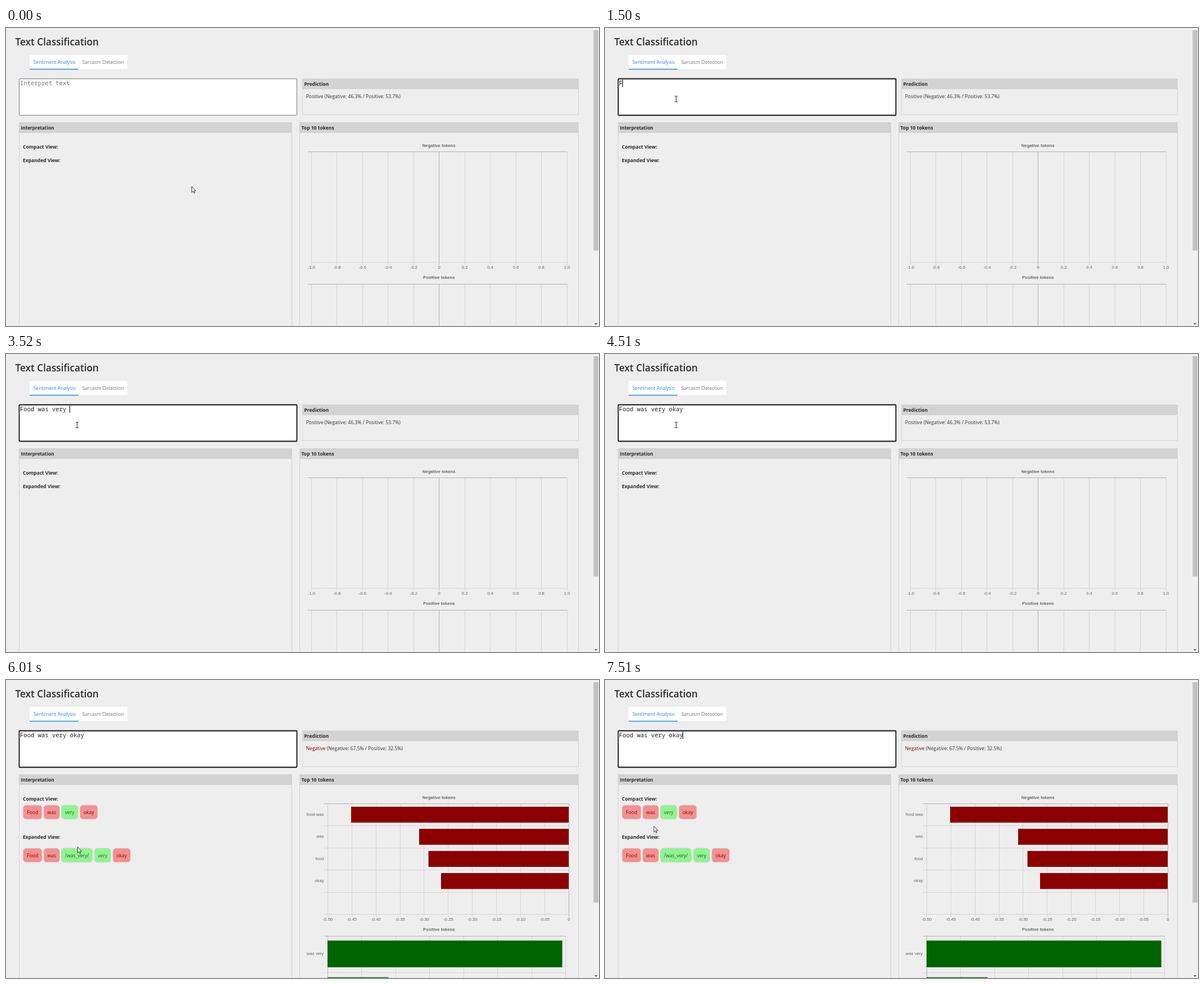
Recreate the animation shown at these times as an HTML page. Size 1055 by 531 pixels, loop 8 s.

```html
<!DOCTYPE html>
<html lang="en">
<head>
<meta charset="utf-8">
<title>Text Classification</title>
<style>
  html, body { margin: 0; width: 100%; height: 100%; overflow: hidden; background: #eee; }
  svg { display: block; width: 100%; height: 100%; }
  text { font: 8.54px "Open Sans", "Noto Sans", sans-serif; fill: #333; white-space: pre; }
  .title { font-size: 17.2px; font-weight: 600; fill: #2b2b2e; }
  .bold { font-weight: 700; fill: #29292c; }
  .chart { font: 7.69px "Liberation Sans", Arial, sans-serif; fill: #666; }
  .caption { font-weight: 700; }
  .mono { font: 10.55px "Noto Sans Mono", "DejaVu Sans Mono", monospace; fill: #222; }
  .hidden { display: none; }
</style>
</head>
<body>
<svg id="stage" viewBox="0 0 1055 531"></svg>
<script>
const LOOP = 8000;
const GRID = '#d5d5d5', AXIS = '#b3b3b3', PANEL = '#d3d3d3';
const RED = '#8b0000', GREEN = '#006400';

const rect = (x, y, w, h, fill, extra = '') =>
  `<rect x="${x}" y="${y}" width="${w}" height="${h}" fill="${fill}" ${extra}/>`;
const line = (x1, y1, x2, y2, color) =>
  `<path d="M${x1} ${y1}L${x2} ${y2}" stroke="${color}"/>`;
const text = (x, y, content, cls = '', extra = '') =>
  `<text x="${x}" y="${y}" class="${cls}" ${extra}>${content}</text>`;
const group = (id, content) => `<g id="${id}">${content}</g>`;
const middle = 'text-anchor="middle"', end = 'text-anchor="end"';
const snap = v => Math.floor(v) + 0.5;

function panel(x, y, w, h, label, extra = '') {
  return rect(x + .5, y + .5, w - 1, h - 1, 'none', `stroke="${PANEL}"`) +
    rect(x, y, w, 19, PANEL) + text(x + 3.5, y + 13, label, 'bold', extra);
}

// Vertical grid lines with tick marks, plus optional labels below.
function columns(left, right, count, top, bottom, zero, label) {
  let out = '';
  for (let i = 0; i <= count; i++) {
    const x = left + (right - left) * i / count;
    out += line(snap(x), top, snap(x), bottom + 5, i === zero ? AXIS : GRID);
    if (label) out += text(x, bottom + 12, label(i), 'chart', middle);
  }
  return out;
}

function emptyCharts() {
  const tick = i => i === 5 ? '0' : (i / 5 - 1).toFixed(1);
  return columns(543.5, 998, 10, 220, 417, 5, tick) +
    line(537, 220.5, 998, 220.5, AXIS) + line(543, 417.5, 998, 417.5, GRID) +
    columns(543.5, 998, 10, 456, 652, 5) + line(537, 456.5, 998, 456.5, AXIS);
}

function filledCharts() {
  const tick = i => i === 10 ? '0' : (i / 20 - .5).toFixed(2);
  const rowHeight = 39.4;
  let out = columns(572.3, 1001.3, 10, 220, 417, 10, tick);
  for (let i = 0; i <= 5; i++) {
    const y = snap(220.4 + i * rowHeight);
    out += line(566, y, 1001, y, i ? GRID : AXIS);
  }
  [['food was', 614], ['was', 735], ['food', 751.6], ['okay', 774]].forEach(([name, x], i) => {
    const y = 220.4 + i * rowHeight;
    out += rect(x, y + 5.4, 1001 - x, 28.4, RED) +
      text(565.6, y + 21.6, name, 'chart', end);
  });
  return out + columns(572, 995.8, 7, 456, 652, 0) +
    line(566, 456.5, 996, 456.5, AXIS) + line(566, 521.5, 996, 521.5, GRID) +
    rect(572, 464.3, 417.7, 47.6, GREEN) + rect(572, 529.7, 108.7, 47.6, GREEN) +
    text(565.2, 490, 'was very', 'chart', end);
}

function chips(y, items) {
  return items.map(([word, x, w, positive]) =>
    rect(x + .5, y + .5, w - 1, 25, positive ? '#90f490' : '#f59090',
      `rx="5.5" stroke="${PANEL}"`) +
    text(x + w / 2, y + 16.4, word, '', `${middle} style="fill:${positive ? '#1c641c' : RED}"`)
  ).join('');
}

const base =
  text(16.5, 31.3, 'Text Classification', 'title') +
  rect(42, 48, 174, 25, '#fff') + rect(42, 72.7, 87, 1.5, '#2a86de') +
  text(48.7, 64.2, 'Sentiment Analysis', '', 'style="fill:#2f8ae0"') +
  text(135.7, 64.2, 'Sarcasm Detection', '', 'style="fill:#6f7a72"') +
  panel(527, 90, 492, 65, 'Prediction') +
  panel(23, 168, 486, 400, 'Interpretation', 'style="font-size:8.25px"') +
  panel(522, 168, 497, 400, 'Top 10 tokens') +
  text(30, 214.6, 'Compact View:', 'bold') +
  text(770.3, 212, 'Negative tokens', 'chart caption', middle) +
  text(770.3, 447, 'Positive tokens', 'chart caption', middle) +
  rect(1044, 0, 11, 531, '#f1f1f1') + rect(1045.4, 4, 8.6, 392.5, '#c1c1c1') +
  '<path d="M1046.8 526h5.4l-2.7 3z" fill="#505050"/>';

const before = emptyCharts() +
  text(533.7, 125, 'Positive (Negative: 46.3% / Positive: 53.7%)') +
  text(30, 239.1, 'Expanded View:', 'bold');

const after = filledCharts() +
  text(533.7, 125, `<tspan fill="${RED}" style="fill:${RED}">Negative</tspan> (Negative: 67.5% / Positive: 32.5%)`) +
  text(30, 282.6, 'Expanded View:', 'bold') +
  chips(222.5, [['Food', 30, 34.5], ['was', 66.5, 29.5], ['very', 98, 30.5, true], ['okay', 131, 32.5]]) +
  chips(299.3, [['Food', 30, 34.5], ['was', 66.5, 29.5], ['/was_very/', 98, 56.5, true],
    ['very', 156.8, 30.2, true], ['okay', 189.5, 32.5]]);

const stage = document.getElementById('stage');
stage.innerHTML = base + group('before', before) + group('after', after) +
  rect(23.5, 90.5, 494, 65, '#fff', 'id="field" rx="1"') +
  text(25, 102.4, '', 'mono', 'id="typed"') +
  rect(0, 92, 1, 13, '#000', 'id="caret"') +
  group('beam', '<path d="M124 121.5h2l.5.5.5-.5h2M126.5 122v9M124 131.5h2l.5-.5.5.5h2" fill="none" stroke="#222"/>') +
  group('arrow', '<path d="M.5.5V11L2.9 8.8 4.5 12.5 6.1 11.8 4.6 8.2H7.6Z" fill="#fff" stroke="#222" stroke-width=".9"/>');

const part = Object.fromEntries(
  ['before', 'after', 'field', 'typed', 'caret', 'beam', 'arrow'].map(id => [id, document.getElementById(id)]));

const MESSAGE = 'Food was very okay';
// [start ms, value]
const typedCount = [[0, 0], [1500, 1], [2010, 4], [2520, 8], [3000, 12], [3520, 14], [4020, 18]];
const caretOn = [[0, false], [990, true], [4510, false], [5510, true], [6010, false],
  [6510, true], [7010, false], [7510, true]];
const arrowAt = [[0, [330, 282]], [500, [122, 215]], [990, null], [6010, [127, 297]],
  [6510, [127, 306]], [7010, [81, 308]], [7510, [86.5, 260]]];

const valueAt = (steps, t) => steps.findLast(([start]) => start <= t)[1];
const show = (el, visible) => el.classList.toggle('hidden', !visible);

function render(t) {
  const count = valueAt(typedCount, t), focused = t >= 990, done = t >= 5010;
  const pointer = valueAt(arrowAt, t);

  show(part.before, !done);
  show(part.after, done);
  part.field.setAttribute('stroke', focused ? '#101010' : '#767676');
  part.field.setAttribute('stroke-width', focused ? 1.8 : 1);

  part.typed.textContent = count ? MESSAGE.slice(0, count) : 'Interpret text';
  part.typed.style.fill = count ? '#222' : '#757575';
  show(part.caret, valueAt(caretOn, t));
  part.caret.setAttribute('x', Math.floor(25 + count * 6.33));

  show(part.beam, !pointer);
  show(part.arrow, pointer);
  if (pointer) part.arrow.setAttribute('transform', `translate(${pointer})`);
}

const origin = performance.now();
function tick() {
  render((performance.now() - origin) % LOOP);
  requestAnimationFrame(tick);
}
tick();
</script>
</body>
</html>
```
